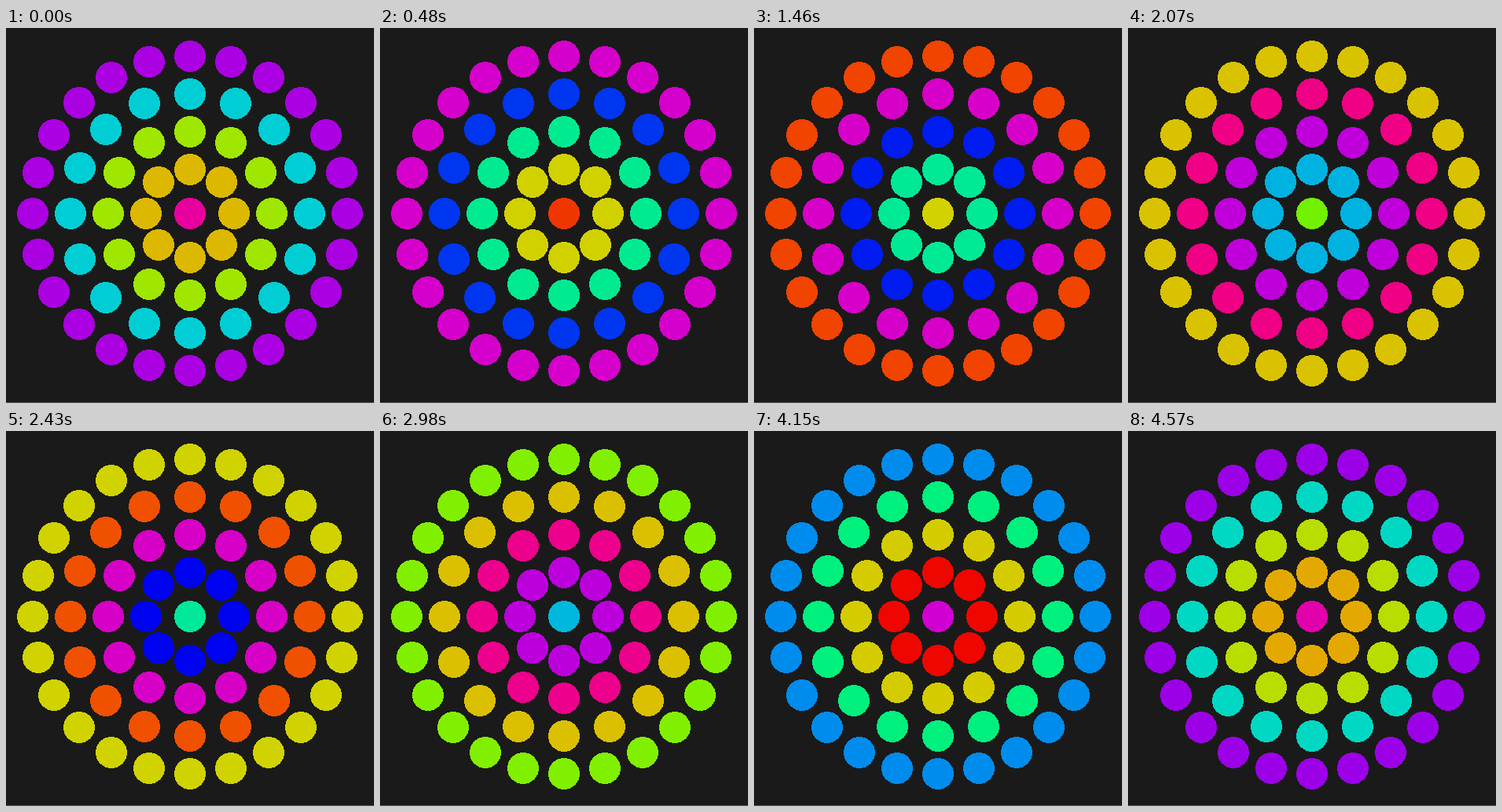
Animation of 468x477 px, one loop 4.71 s. Source, as an HTML page:

```html
<!DOCTYPE html>
<html lang="en">
<head>
<meta charset="utf-8">
<title>Colour rings</title>
<style>
  html, body { margin: 0; width: 100%; height: 100%; overflow: hidden; background: #1a1a1a; }
  svg { display: block; width: 468px; height: 477px; }
</style>
</head>
<body>
<svg id="stage" viewBox="0 0 468 477" shape-rendering="crispEdges">
  <rect width="468" height="477" fill="#1a1a1a"/>
  <rect y="476" width="468" height="1" fill="#50565e"/>
</svg>
<script>
const NS = 'http://www.w3.org/2000/svg';
const LOOP = 4710, TICK = LOOP / 68;
const CX = 234, CY = 236, DOT = 20, RINGS = 5;

// Key points of the colour cycle: [phase, hue]. Hue lingers on the mixed
// colours and hurries through red, green and blue.
const KEYS = [
  [0.2, 326], [0.4, 360], [0.75, 401], [1, 410], [1.75, 424],
  [2.2, 450], [2.4, 511], [3.4, 562], [3.75, 637], [5.2, 686]
];

function hueAt(phase) {
  const first = KEYS[0][0];
  const p = first + (phase - first + RINGS) % RINGS;
  const i = KEYS.findIndex(key => key[0] > p);
  const [p0, h0] = KEYS[i - 1], [p1, h1] = KEYS[i];
  return (h0 + (h1 - h0) * (p - p0) / (p1 - p0)) % 360;
}

// Fully saturated colour, a little darker around yellow, cyan and magenta.
function colour(hue) {
  const value = Math.min(240, 210 + 1.08 * Math.abs(hue % 120 - 60));
  const channel = shift => {
    const d = Math.abs((hue + shift) % 360 - 180);
    return Math.round(value * Math.min(1, Math.max(0, d / 60 - 1)));
  };
  return `rgb(${channel(0)},${channel(240)},${channel(120)})`;
}

function makeRing(ring) {
  const group = stage.appendChild(document.createElementNS(NS, 'g'));
  const radius = ring ? 8 + 48 * ring : 0;
  const count = [1, 8, 12, 16, 24][ring];
  for (let i = 0; i < count; i++) {
    const angle = 2 * Math.PI * i / count;
    const dot = group.appendChild(document.createElementNS(NS, 'circle'));
    dot.setAttribute('cx', CX + Math.round(radius * Math.sin(angle)));
    dot.setAttribute('cy', CY - Math.round(radius * Math.cos(angle)));
    dot.setAttribute('r', DOT);
  }
  return group;
}

const stage = document.getElementById('stage');
const rings = Array.from({ length: RINGS }, (_, ring) => makeRing(ring));

// Each ring runs one fifth of the cycle ahead of the ring inside it.
function draw(time) {
  const tick = Math.floor((time + 10) / TICK) * TICK;
  const phase = RINGS * tick / LOOP;
  rings.forEach((group, ring) => group.setAttribute('fill', colour(hueAt(phase + ring))));
}

const start = performance.now();
function frame() {
  draw((performance.now() - start) % LOOP);
  requestAnimationFrame(frame);
}
frame();
</script>
</body>
</html>
```
